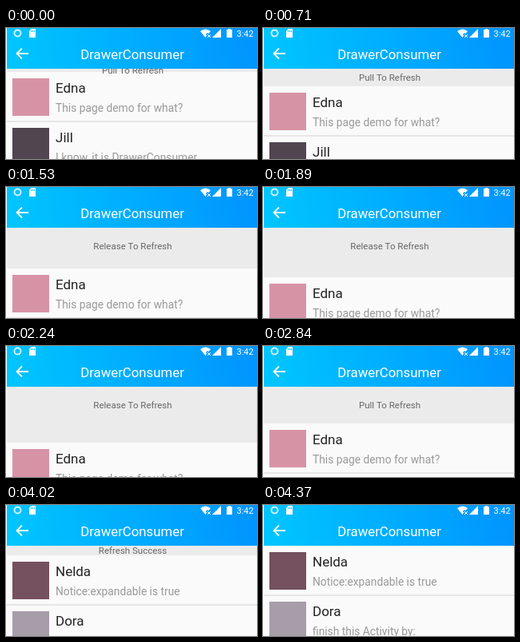
Write an HTML page with a canvas that moves like this. It is 314x164 px and loops after 4.49 s.

```html
<!DOCTYPE html>
<html lang="en">
<head>
<meta charset="utf-8">
<title>Pull to refresh</title>
<style>
  html, body { margin: 0; width: 100%; height: 100%; overflow: hidden; background: #fafafa; }
  canvas { display: block; }
</style>
</head>
<body>
<canvas id="stage" width="314" height="164"></canvas>
<script>
const ctx = document.getElementById('stage').getContext('2d');
const WIDTH = 314, HEIGHT = 164, LOOP = 4490, STEPS = 38;
const BAR_BOTTOM = 51, HEADER = 46, ROW = 62;

// Pull distance in pixels: [step, distance], linear in between.
const pullKeys = [
  [0, 4], [3, 15], [4, 15], [6, 22], [10, 34], [14, 56], [16, 62], [19, 70], [22, 70],
  [23, 52], [24, 46], [31, 46], [32, 42], [34, 12], [35, 4], [36, 1], [37, 0]
];
const REFRESH_START = 25, SPIN_END = 29, REFRESH_END = 32;

const before = [
  { name: 'Edna', note: 'This page demo for what?', color: '#d793a6' },
  { name: 'Jill', note: 'I know, it is DrawerConsumer', color: '#51454f' }
];
const after = [
  { name: 'Nelda', note: 'Notice:expandable is true', color: '#75505f' },
  { name: 'Dora', note: 'finish this Activity by:', color: '#a79da9' }
];

function pullAt(step) {
  const i = Math.max(1, pullKeys.findIndex(([s]) => s >= step));
  const [s0, p0] = pullKeys[i - 1], [s1, p1] = pullKeys[i];
  return Math.round(p0 + (p1 - p0) * (step - s0) / (s1 - s0));
}

function labelAt(step, pull) {
  if (step >= REFRESH_END) return 'Refresh Success';
  if (step >= REFRESH_START) return 'Refreshing...';
  return pull > HEADER ? 'Release To Refresh' : 'Pull To Refresh';
}

function rect(x, y, w, h, color) {
  ctx.fillStyle = color;
  ctx.fillRect(x, y, w, h);
}

function text(str, x, y, size, color, align = 'left') {
  ctx.font = `${size}px Roboto, sans-serif`;
  ctx.textAlign = align;
  ctx.fillStyle = color;
  ctx.fillText(str, x, y);
}

function polygon(points, color) {
  ctx.fillStyle = color;
  ctx.fill(new Path2D(`M${points}Z`));
}

function drawRow({ name, note, color }, y) {
  rect(8, y + 8, 46, 47, color);
  text(name, 62, y + 26, 17, '#222');
  text(note, 62, y + 50, 13.8, '#999');
  rect(0, y + ROW - 1, WIDTH, 2, '#e6e6e6');
}

function drawHeader(step, pull) {
  if (!pull) return;
  const middle = BAR_BOTTOM + Math.min(pull, HEADER) / 2;
  ctx.save();
  ctx.beginPath();
  ctx.rect(0, BAR_BOTTOM, WIDTH, pull + 2);
  ctx.clip();
  text(labelAt(step, pull), 158.5, middle + 4, 11.5, '#666', 'center');
  if (step >= REFRESH_START && step < REFRESH_END) {
    const turn = Math.min(step, SPIN_END) * 1.3;
    ctx.strokeStyle = '#888';
    ctx.lineWidth = 1.5;
    ctx.beginPath();
    ctx.arc(89, middle + 0.5, 5, turn, turn + 4.4);
    ctx.stroke();
  }
  ctx.restore();
}

function drawStatusIcons() {
  // Recording ring and memory card
  ctx.strokeStyle = '#d5f3ff';
  ctx.lineWidth = 2;
  ctx.beginPath();
  ctx.arc(14.5, 6.5, 4, 0, 7);
  ctx.stroke();
  polygon('31.5 1H37V12H29V4', '#fff');
  for (const x of [31, 33, 35]) rect(x, 3, 1, 2, '#00baff');

  // Wi-Fi, signal and battery
  polygon('243 4Q249.500 -1 256 4L249.500 12', '#fff');
  ctx.strokeStyle = '#0099ff';
  ctx.lineWidth = 3;
  ctx.stroke(new Path2D('M251 7L256 12M256 7L251 12'));
  ctx.strokeStyle = '#fff';
  ctx.lineWidth = 1;
  ctx.stroke(new Path2D('M252 8L256 12M256 8L252 12'));
  polygon('269 1V12H258', '#fff');
  polygon('276 2H278V1H281V2H283V12H276', '#fff');
  text('3:42', 288.5, 11, 11, '#fff');
}

function drawBar() {
  const blue = ctx.createLinearGradient(0, 51, WIDTH, 0);
  blue.addColorStop(0, '#00c6ff');
  blue.addColorStop(1, '#0094ff');
  rect(0, 0, WIDTH, BAR_BOTTOM, blue);
  drawStatusIcons();
  ctx.strokeStyle = '#fff';
  ctx.lineWidth = 1.8;
  ctx.stroke(new Path2D('M28 32H13.500M20 25.500L13.500 32L20 38.500'));
  text('DrawerConsumer', 158, 39, 16.8, '#fff', 'center');
}

function draw(now) {
  const step = Math.min(STEPS - 1, Math.floor((now % LOOP) / LOOP * STEPS + 0.07));
  const pull = pullAt(step);
  const top = BAR_BOTTOM + pull;
  rect(0, 0, WIDTH, HEIGHT, '#fafafa');
  rect(0, BAR_BOTTOM, WIDTH, pull, '#ebebeb');
  (step < REFRESH_END ? before : after).forEach((row, i) => drawRow(row, top + i * ROW));
  drawHeader(step, pull);
  drawBar();
  rect(0, 0, 1, HEIGHT, '#fff');
  requestAnimationFrame(animate);
}

const start = performance.now();
function animate() {
  draw(performance.now() - start);
}
animate();
</script>
</body>
</html>
```
